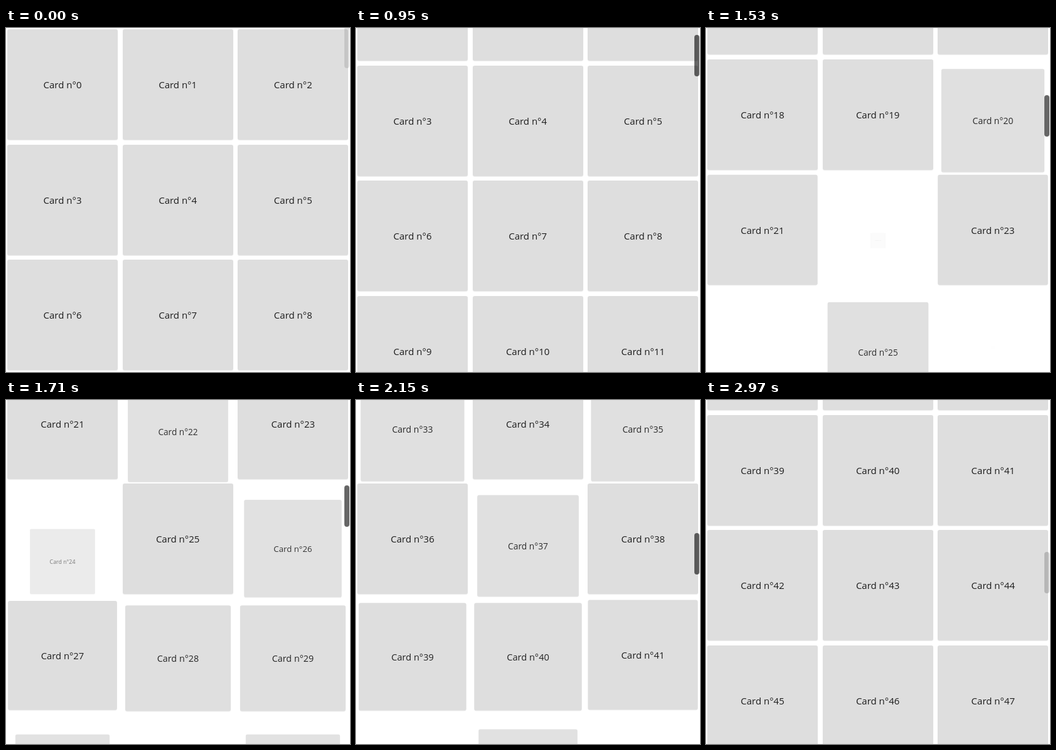
An HTML page for the animation above (3410 ms loop, 548x548 px).

```html
<!DOCTYPE html>
<html lang="en">
<head>
<meta charset="utf-8">
<title>Card list</title>
<style>
  html, body {
    margin: 0;
    width: 100%;
    height: 100%;
    overflow: hidden;
    background: #fff;
  }
  #stage {
    position: fixed;
    inset: 0;
    overflow: clip;
    contain: strict;
  }
  #list {
    position: absolute;
    left: 0;
    width: 548px;
  }
  .card {
    position: absolute;
    width: 176px;
    height: 176px;
    display: flex;
    align-items: center;
    justify-content: center;
    border-radius: 3px;
    background: #dedede;
    box-shadow: 0 1px 1px rgba(0, 0, 0, .08);
    color: #1c1c1c;
    font: 15px "Open Sans", "Noto Sans", sans-serif;
    white-space: nowrap;
  }
  #thumb {
    position: absolute;
    left: 539px;
    width: 8px;
    height: 66px;
    border-radius: 4px;
    background: #000;
  }
</style>
</head>
<body>
<div id="stage">
  <div id="list"></div>
  <div id="thumb"></div>
</div>
<script>
const LOOP = 3410;
const TICK = 20;
const COLUMNS = 3;
const ROWS = 16;
const PITCH = 551 / 3;
const READY_ROWS = 5;
const ENTER_MS = 360;

// [time, scroll offset]
const scrollKeys = [
  [450, 0], [640, 100], [890, 100], [950, 126], [1350, 775.3],
  [1710, 1338], [1950, 1754.7], [2350, 2288.3], [2610, 2366]
];

const list = document.getElementById("list");
const thumb = document.getElementById("thumb");

// Rows enter at a steady pace; a wave over the index staggers their cards.
function enterTime(index, row) {
  if (row < READY_ROWS) return -Infinity;
  const wave = Math.cos(2 * Math.PI * (5 * index + 0.5) / 11);
  return 1015 + 105 * (row - READY_ROWS) + 300 * Math.max(0, wave);
}

const cards = Array.from({ length: COLUMNS * ROWS }, (_, i) => {
  const row = Math.floor(i / COLUMNS);
  const el = document.createElement("div");
  el.className = "card";
  el.textContent = "Card n°" + i;
  el.style.left = 2 + PITCH * (i % COLUMNS) + "px";
  el.style.top = 2 + PITCH * row + "px";
  list.append(el);
  return { el, start: enterTime(i, row) };
});

const clamp01 = x => Math.min(1, Math.max(0, x));

function secant(i) {
  const a = scrollKeys[i], b = scrollKeys[i + 1];
  return a && b ? (b[1] - a[1]) / (b[0] - a[0]) : 0;
}

// Harmonic mean keeps the curve monotone.
function slope(i) {
  const before = secant(i - 1), after = secant(i);
  return before * after > 0 ? 2 * before * after / (before + after) : 0;
}

function scrollAt(t) {
  const last = scrollKeys.length - 1;
  if (t <= scrollKeys[0][0]) return 0;
  if (t >= scrollKeys[last][0]) return scrollKeys[last][1];
  const i = scrollKeys.findIndex(key => key[0] > t) - 1;
  const [t0, y0] = scrollKeys[i], [t1, y1] = scrollKeys[i + 1];
  const span = t1 - t0, u = (t - t0) / span, v = 1 - u;
  return y0 * v * v * (1 + 2 * u) + y1 * u * u * (3 - 2 * u)
    + span * u * v * (slope(i) * v - slope(i + 1) * u);
}

function thumbAlpha(t) {
  if (t < 470) return 0.11;
  if (t < 2810) return 0.6;
  return 0.6 - 0.105 * Math.min(4, Math.floor((t - 2810) / 53) + 1);
}

function drawCard({ el, start }, t) {
  const s = 1 - (1 - clamp01((t - start) / ENTER_MS)) ** 3;
  el.style.visibility = s > 0 ? "visible" : "hidden";
  el.style.opacity = s;
  el.style.transform = s < 1 ? `scale(${s}) translateY(${150 * (1 - s)}px)` : "none";
}

function draw(time) {
  const t = Math.floor((time - 10) / TICK) * TICK + 10;
  const y = scrollAt(t);
  list.style.top = -y + "px";
  thumb.style.top = Math.round(y * 0.1032 - 2) + "px";
  thumb.style.opacity = thumbAlpha(t);
  cards.forEach(card => drawCard(card, t));
}

const origin = performance.now();
function frame() {
  draw((performance.now() - origin) % LOOP);
  requestAnimationFrame(frame);
}
draw(0);
requestAnimationFrame(frame);
</script>
</body>
</html>
```
